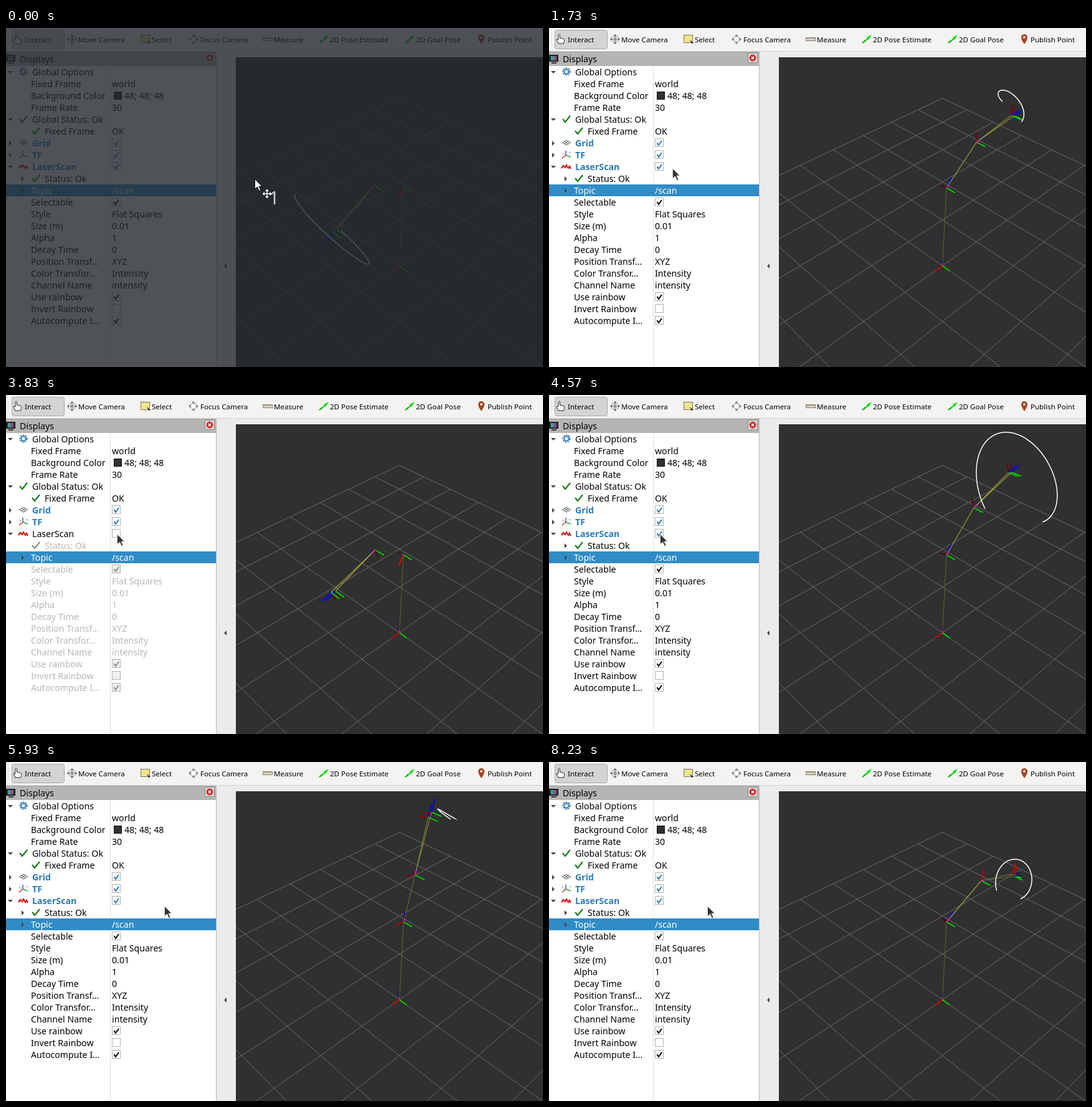
Animation, 862 px wide and 544 px high, one loop 8260 ms. Source, as an HTML page with a canvas:

```html
<!DOCTYPE html>
<html lang="en">
<head>
<meta charset="utf-8">
<title>Robot arm display</title>
<style>
  html, body { margin: 0; width: 100%; height: 100%; overflow: hidden; background: #edebe9; }
  svg, canvas { position: absolute; left: 0; top: 0; }
  text { font-family: "Noto Sans", "Open Sans", sans-serif; font-size: 14.15px; white-space: pre; }
  .tool text { font-size: 11.55px; }
</style>
</head>
<body>
<svg width="862" height="544"><g id="bar" class="tool"></g><g id="panel"></g></svg>
<canvas width="862" height="544"></canvas>
<script>
const LOOP = 8260;
const $ = id => document.getElementById(id);
const ctx = document.querySelector('canvas').getContext('2d');

// ---- window chrome ----
const rect = (x, y, w, h, fill, more = '') => `<rect x="${x}" y="${y}" width="${w}" height="${h}" fill="${fill}" ${more}/>`;
const text = (x, y, s, fill = '#000', more = '') => `<text x="${x}" y="${y}" fill="${fill}" ${more}>${s}</text>`;
const line = (d, stroke, w = 1, more = '') => `<path d="${d}" fill="none" stroke="${stroke}" stroke-width="${w}" ${more}/>`;
const shape = (d, fill) => `<path d="${d}" fill="${fill}"/>`;

const poseArrow = x => line(`M${x} 24l9-7`, '#0c0', 2) + shape(`M${x + 7} 15l8-4-5 8z`, '#0d0') + shape(`M${x - 1} 25l5-6 1 3z`, '#0a0');
const moveIcon = (x, y, c) => line(`M${x - 7} ${y}h14M${x} ${y - 7}v14`, c, 1.2) +
  [0, 90, 180, 270].map(a => `<path transform="rotate(${a} ${x} ${y})" d="M${x - 3} ${y - 5}l3-3 3 3z" fill="${c}"/>`).join('');

function toolbar() {
  const labels = [[30, 'Interact'], [116, 'Move Camera'], [234, 'Select'], [312, 'Focus Camera'],
    [430, 'Measure'], [520, '2D Pose Estimate'], [658, '2D Goal Pose'], [773, 'Publish Point']];
  return rect(0, 0, 862, 38, '#f4f3f2') + rect(0, 37, 862, 1, '#d5d3d1') +
    line('M3.5 10v18', '#bbb', 1, 'stroke-dasharray="1 2"') +
    rect(9.5, 3.5, 84, 30, '#d6d4d2', 'rx="3" stroke="#aaa7a4"') +
    `<path d="M15 25l-3-6q0-2 3 0v-8q1.500-2 2.500 0v5l6 1.500q2 1 1 4l-1 3.500z" fill="#fff" stroke="#222"/>` +
    moveIcon(106, 18, '#666') + line('M101 13l10 10M111 13l-10 10', '#888') +
    rect(216.5, 11.5, 14, 12, '#f2e58c', 'stroke="#333" stroke-dasharray="2 1"') + shape('M226 19l6 5-3 1z', '#222') +
    moveIcon(301, 18, '#888') + `<circle cx="301" cy="18" r="4.500" fill="#fff" stroke="#888"/>` +
    rect(412.5, 15.5, 15, 5, '#e4d9bd', 'stroke="#777"') + line('M415.500 16v2m3-2v2m3-2v2m3-2v2', '#777') +
    poseArrow(503) + poseArrow(641) +
    shape('M763 26q-5-7-5-11a5 5 0 0 1 10 0q0 4-5 11z', '#a8431f') + `<circle cx="763" cy="15" r="2" fill="#eee"/>` +
    labels.map(([x, s]) => text(x, 23, s)).join('');
}

const tick = (x, y, c) => line(`M${x - 6} ${y}l4 5 8-10`, c, 2.2);
const noEntry = (x, y) => `<circle cx="${x}" cy="${y}" r="8" fill="#d8161b"/>` + rect(x - 5, y - 2, 10, 4, '#fff');
const twisty = (x, y, open) => shape(open ? `M${x - 4} ${y - 2}h8l-4 4z` : `M${x - 2} ${y - 4}v8l4-4z`, '#444');
const box = (y, on, c, bg = '#fff') => rect(170.5, y - 7.5, 13, 13, bg, 'stroke="#b4b2b0"') +
  (on ? line(`M173.500 ${y - 1}l2.500 4 5-7`, c, 2) : '');

function panel(state) {
  const off = state == 'off', bad = state == 'error';
  const blue = '#2a7ab9', red = '#b82025', green = '#1b7a1b', bold = 'font-weight="bold"';
  const rowY = i => 71 + 19 * i;
  const label = (x, i, s, c, more) => text(x, rowY(i) + 4.5, s, c, more);
  const props = [['Selectable', true], ['Style', 'Flat Squares'], ['Size (m)', '0.01'], ['Alpha', '1'], ['Decay Time', '0'],
    ['Position Transf…', 'XYZ'], ['Color Transfor…', 'Intensity'], ['Channel Name', 'intensity'],
    ['Use rainbow', true], ['Invert Rainbow', false], ['Autocompute I…', true]];
  const ink = off ? '#b9b7b5' : '#000';
  let s = rect(0, 38, 338, 23, '#b7b5b3') + rect(0, 38, 338, 1, '#a5a3a1') + text(22, 54.5, 'Displays') +
    rect(.5, 43.5, 14, 10, '#234', 'stroke="#111"') + rect(3, 45, 3, 7, '#4a6') + rect(6, 45, 3, 7, '#47c') + rect(9, 45, 3, 7, '#a45') + rect(4, 55, 8, 2, '#333') +
    rect(319.5, 40.5, 15, 15, '#ddd', 'rx="2" stroke="#888"') + `<circle cx="327" cy="48" r="5.500" fill="#d32f2f"/>` + line('M325 46l4 4m0-4l-4 4', '#fff', 1.5) +
    rect(0, 61, 337, 483, '#fff') + rect(167, 61, 1, 483, '#dedede') + rect(337, 38, 1, 506, '#bcbab8') +
    rect(0, 251, 337, 19, '#308cc6') + line('M341.500 375v15', '#bbb', 1, 'stroke-dasharray="1 2"') + shape('M354 378v8l-4-4z', '#444');
  s += twisty(7, 71, true) + `<circle cx="28" cy="70" r="5.500" fill="none" stroke="#4a86b8" stroke-width="2.500" stroke-dasharray="2.500 1.500"/><circle cx="28" cy="70" r="3.500" fill="none" stroke="#4a86b8" stroke-width="2"/>` + label(42, 0, 'Global Options');
  s += label(40, 1, 'Fixed Frame') + label(170, 1, 'world') + label(40, 2, 'Background Color') +
    rect(173.5, 102.5, 12, 12, '#303030', 'stroke="#111"') + label(190, 2, '48; 48; 48') + label(40, 3, 'Frame Rate') + label(170, 3, '30');
  s += twisty(7, 147, true) + tick(28, 146, green) + label(42, 4, 'Global Status: Ok') + tick(48, 165, green) + label(62, 5, 'Fixed Frame') + label(170, 5, 'OK');
  s += twisty(7, 185) + line('M21.500 184l6.500-4 6.500 4-6.500 4zM25 182l6 4m0-4l-6 4', '#555') + label(42, 6, 'Grid', blue, bold) + box(185, true, blue);
  s += twisty(7, 204) + line('M27 204v-7', '#35c', 1.5) + line('M27 204l-6 5', '#c33', 1.5) + line('M27 204l8 3', '#2a2', 1.5) + line('M21 200l3 3m8-4l3 2', '#777') + label(42, 7, 'TF', blue, bold) + box(204, true, blue);
  s += twisty(7, 223, true) + (bad ? noEntry(28, 222) : line('M20 225l3-4 3 3 2-4 3 5 2-3 2 4', '#d8161b', 2.2)) +
    label(42, 8, 'LaserScan', off ? '#000' : bad ? red : blue, off ? '' : bold) + box(223, !off, bad ? red : blue);
  s += (off ? '' : twisty(27, 242)) + (bad ? noEntry(48, 241) : tick(48, 241, off ? '#8a8a8a' : green)) +
    label(62, 9, bad ? 'Status: Error' : 'Status: Ok', bad ? red : ink);
  s += twisty(27, 261) + label(40, 10, 'Topic', '#fff') + label(170, 10, '/scan', '#fff');
  props.forEach(([name, v], k) => {
    const i = 11 + k;
    s += label(40, i, name, ink) + (typeof v == 'string' ? label(170, i, v, ink) : box(rowY(i), v, off ? '#8c8a88' : '#000', off ? '#f1f0ef' : '#fff'));
  });
  return s;
}

// ---- 3D view: orbit camera 10 m away, yaw and pitch 45 degrees ----
const H = Math.SQRT1_2;
function project([x, y, z]) {
  const near = (x + y) / 2, up = z * H - near, depth = 10 - near - z * H;
  return [631.5 + 806 * (y - x) * H / depth, 381.5 - 806 * up / depth];
}
// Point given in a frame at o, turned by angle a about the y axis
const place = (o, a, [x, y, z]) => [o[0] + x * Math.cos(a) + z * Math.sin(a), o[1] + y, o[2] - x * Math.sin(a) + z * Math.cos(a)];

function stroke(points, color, width) {
  ctx.beginPath();
  points.forEach(p => ctx.lineTo(...project(p)));
  ctx.strokeStyle = color;
  ctx.lineWidth = width;
  ctx.stroke();
}
// Lines seen end-on are darker
function light(a, b) {
  const d = a.map((v, i) => b[i] - v), n = Math.hypot(...d);
  return 1 - ((d[0] + d[1]) / 2 + d[2] * H) ** 2 / (n * n);
}
function arm(t) {
  const a = Math.sin(5 * t + 1.59), shoulder = [0, .1, 1.95];
  const elbow = place(shoulder, a, [0, .1, .9]);
  return { a, shoulder, elbow, eye: place(elbow, 2 * a, [.05, 0, .9]), laser: place(elbow, 2 * a, [0, 0, .975]) };
}
function axes(o, a) {
  [[.2, 0, 0], [0, .2, 0], [0, 0, .2]].forEach((v, i) => {
    const end = place(o, a, v), c = [0, 0, 0];
    c[i] = Math.min(255, 290 * light(o, end));
    stroke([o, end], `rgb(${c})`, 1.8);
  });
}
function link(child, parent) {
  const v = 20 + 160 * light(child, parent);
  stroke([child, parent], `rgb(${v},${v},${v * .2 + 25})`, 1.1);
  const n = Math.hypot(...child.map((c, i) => c - parent[i]));
  stroke([parent, parent.map((p, i) => p + (child[i] - p) * .07 / n)], '#d01f90', 2);
}
function scan(t) {
  const r = Math.abs(Math.sin(3 * t + .84)), pts = [];
  for (let k = 0; k <= 1.001; k += 1 / 90) {
    const { a, laser } = arm(t - .045 + .03 * k), f = (k - .5) * 1.5 * Math.PI;
    pts.push(place(laser, 2 * a, [r * Math.cos(f), r * Math.sin(f), 0]));
  }
  stroke(pts, '#fff', 1.5);
}
function view(t, showScan) {
  ctx.save();
  ctx.beginPath();
  ctx.rect(369, 47, 493, 497);
  ctx.clip();
  ctx.fillStyle = '#303030';
  ctx.fillRect(369, 47, 493, 497);
  for (let i = -5; i <= 5; i++) {
    stroke([[i, -5, 0], [i, 5, 0]], '#6c6c6c', 1);
    stroke([[-5, i, 0], [5, i, 0]], '#6c6c6c', 1);
  }
  const { a, shoulder, elbow, eye, laser } = arm(t), base = [0, 0, 0];
  axes(base, 0);
  axes(shoulder, a);
  axes(elbow, 2 * a);
  axes(eye, 2 * a);
  axes(laser, 2 * a);
  link(shoulder, base);
  link(elbow, shoulder);
  link(eye, elbow);
  link(laser, elbow);
  if (showScan) scan(t);
  ctx.restore();
}

// ---- pointer and countdown shade ----
const trail = [[0, 399, 242], [900, 399, 242], [1730, 198, 225], [2100, 178, 223], [4700, 178, 223], [5170, 234, 226], [5400, 254, 231], [LOOP, 254, 231]];
function pointer(ms) {
  const i = trail.findIndex(p => p[0] > ms), [t0, x0, y0] = trail[i - 1], [t1, x1, y1] = trail[i];
  const k = (ms - t0) / (t1 - t0), x = x0 + (x1 - x0) * k, y = y0 + (y1 - y0) * k, inView = x > 369;
  ctx.save();
  ctx.translate(x, y);
  const arrow = new Path2D('M.5 .5v16l4-3.500 3 6.500 2.500-1-3-6.500h5z');
  ctx.lineWidth = 1;
  ctx.fillStyle = inView ? '#fff' : '#333';
  ctx.strokeStyle = inView ? '#111' : '#ddd';
  ctx.fill(arrow);
  ctx.stroke(arrow);
  if (inView) {
    ctx.translate(20, 24);
    ctx.strokeStyle = ctx.fillStyle = '#fff';
    ctx.lineWidth = 1.5;
    for (let q = 0; q < 4; q++) {
      ctx.rotate(Math.PI / 2);
      ctx.stroke(new Path2D('M0 0v-6'));
      ctx.fill(new Path2D('M-3 -4l3-3.500 3 3.500z'));
    }
  }
  ctx.restore();
}
function shade(ms) {
  const k = Math.min(1, 1 - (ms - 30) / 370);
  if (k <= 0) return;
  ctx.globalAlpha = k;
  ctx.fillStyle = 'rgba(36,40,46,.8)';
  ctx.fillRect(0, 0, 862, 544);
  ctx.fillStyle = '#d0d1d3';
  ctx.font = '29px "Noto Sans", sans-serif';
  ctx.fillText('1', 422, 283);
  ctx.globalAlpha = 1;
}

const errors = [[4600, 5500], [6350, 6600], [6950, 7350], [7800, 8000]];
const stateAt = ms => ms >= 2500 && ms < 4550 ? 'off' : errors.some(([a, b]) => ms >= a && ms < b) ? 'error' : 'ok';

$('bar').innerHTML = toolbar();
let shown;
function frame(now) {
  const ms = now % LOOP, state = stateAt(ms);
  if (state != shown) $('panel').innerHTML = panel(shown = state);
  ctx.clearRect(0, 0, 862, 544);
  view(ms / 1000, ms < 2570 || state != 'off');
  shade(ms);
  pointer(ms);
  requestAnimationFrame(frame);
}
frame(0);
</script>
</body>
</html>
```
